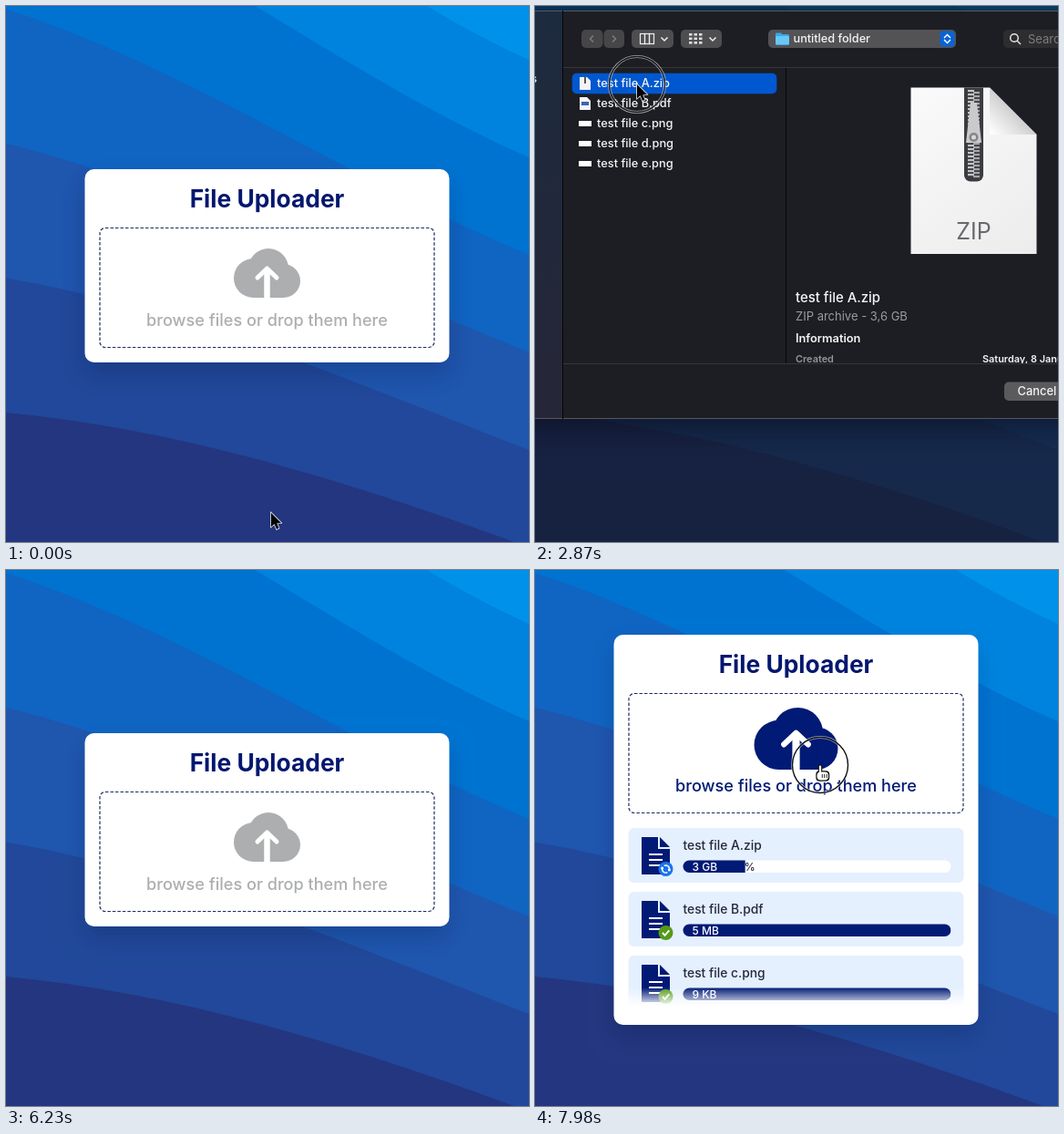
Write an HTML page with a canvas that moves like this. It is 574x588 px and loops after 8000 ms.

```html
<!DOCTYPE html>
<html lang="en">
<head>
<meta charset="utf-8">
<title>File Uploader</title>
<style>
html, body { margin: 0; width: 574px; height: 588px; overflow: hidden; background: #0073d1; }
canvas { display: block; width: 574px; height: 588px; }
</style>
</head>
<body>
<canvas id="stage"></canvas>
<script>
const W = 574, H = 588, LOOP = 8000, STEP = 70;
const NAVY = '#001a75', INK = '#25283a', PALE = '#e4f0fe', LIGHT = '#f4f4f6', GREEN = '#78b828';
const canvas = document.getElementById('stage');
const c = canvas.getContext('2d');
const dpr = window.devicePixelRatio || 1;
canvas.width = W * dpr;
canvas.height = H * dpr;

const span = (t, a, b) => Math.max(0, Math.min(1, (t - a) / (b - a)));
const lerp = (a, b, k) => a + (b - a) * k;
const smooth = k => k * k * (3 - 2 * k);
const easeOut = k => 1 - (1 - k) ** 3;
const grey = v => `rgb(${v},${v},${v + 3})`;

function rect(x, y, w, h, fill, r = 0) {
  c.beginPath();
  c.roundRect(x, y, w, h, r);
  c.fillStyle = fill;
  c.fill();
}
function text(s, x, y, size, fill, weight = 400, align = 'left') {
  c.font = `${weight} ${size}px Inter, sans-serif`;
  c.textAlign = align;
  c.fillStyle = fill;
  c.fillText(s, x, y);
}
function trace(points) {
  c.beginPath();
  points.forEach(([x, y]) => c.lineTo(x, y));
}
function poly(points, fill) {
  trace(points);
  c.fillStyle = fill;
  c.fill();
}
function line(points, stroke, width = 1.5) {
  trace(points);
  c.strokeStyle = stroke;
  c.lineWidth = width;
  c.stroke();
}
function disc(x, y, r, fill) {
  c.beginPath();
  c.arc(x, y, r, 0, 7);
  c.fillStyle = fill;
  c.fill();
}
function ring(x, y, r, stroke, width, from = 0, to = 7) {
  c.beginPath();
  c.arc(x, y, r, from, to);
  c.strokeStyle = stroke;
  c.lineWidth = width;
  c.stroke();
}
function at(x, y, draw, angle = 0, scale = 1) {
  c.save();
  c.translate(x, y);
  c.rotate(angle);
  c.scale(scale, scale);
  draw();
  c.restore();
}
function clipped(x, y, w, h, draw, r = 0) {
  c.save();
  c.beginPath();
  c.roundRect(x, y, w, h, r);
  c.clip();
  draw();
  c.restore();
}
function shadowed(color, blur, dy, draw) {
  c.save();
  c.shadowColor = color;
  c.shadowBlur = blur * dpr;
  c.shadowOffsetY = dy * dpr;
  draw();
  c.restore();
}
function fade(x0, y0, x1, y1, from, to) {
  const g = c.createLinearGradient(x0, y0, x1, y1);
  g.addColorStop(0, from);
  g.addColorStop(1, to);
  return g;
}
// Sheet of paper with its top right corner cut
function page(x, y, w, h, fold, fill) {
  poly([[x, y], [x + w - fold, y], [x + w, y + fold], [x + w, y + h], [x, y + h]], fill);
}

// Evenly spaced waves, from the top right corner down
const waves = ['#243680', '#21489a', '#1f56ae', '#1064c2', '#0073d1', '#0083de'];
function background() {
  rect(0, 0, W, H, '#0092ea');
  for (let k = 5; k >= 0; k--) {
    const left = 446 - 147.5 * k, right = 594 - 107 * k;
    c.beginPath();
    c.moveTo(0, left);
    c.bezierCurveTo(190, left + 18 + 14 * k, 380, right - 72 - 3 * k, W, right);
    c.lineTo(W, H + 9);
    c.lineTo(0, H + 9);
    c.fillStyle = waves[k];
    c.fill();
  }
}

function cloud(fill) {
  disc(-15, 5.5, 21.5, fill);
  disc(1.5, -5, 22, fill);
  disc(18, 8.5, 18.5, fill);
  rect(-15, 0, 33, 27, fill);
  c.lineCap = c.lineJoin = 'round';
  line([[-10.5, 5], [0, -5], [10.5, 5]], '#fff', 5);
  c.lineCap = 'butt';
  line([[0, -4], [0, 27.5]], '#fff', 6.5);
}

function badge(done, t) {
  disc(0, 0, 8, done ? '#559b18' : '#1a73e8');
  if (done) return line([[-3.5, 0], [-1, 2.8], [3.8, -2.6]], '#fff', 1.9);
  for (let i = 0; i < 2; i++) {
    const a = t / 400 + Math.PI * i;
    ring(0, 0, 4, '#fff', 1.5, a, a + 2.2);
    disc(4 * Math.cos(a + 2.3), 4 * Math.sin(a + 2.3), 1.5, '#fff');
  }
}

function fileRow(y, name, size, part, done, t) {
  rect(102.5, y, 368, 60, PALE, 6);
  at(117, y + 10, () => {
    page(0, 0, 31, 41, 11, NAVY);
    line([[19, 0], [19, 12], [31, 12]], PALE, 2);
    for (let i = 0; i < 3; i++) rect(8, 18 + 6 * i, 15, 2, '#fff');
  });
  at(143.5, y + 45, () => badge(done, t));
  text(name, 162.5, y + 23.5, 13.8, INK, 500);
  clipped(162.5, y + 35.5, 294, 13.5, () => {
    const w = 294 * part, base = y + 46.5;
    rect(162, y + 35, 295, 15, '#fff');
    text(size, 172.5, base, 12, NAVY, 500);
    if (!done) {
      rect(207, y + 38, 1, 9, NAVY);
      text(Math.round(part * 100) + 2 + '%', 215, base, 12, INK, 500);
    }
    rect(162, y + 35, w + 0.5, 15, NAVY);
    // A narrow bar wraps the unit out of sight
    if (w > 18) text(w > 38 ? size : size[0], 172.5, base, 12, '#fff', 500);
  }, 7);
}

function card(t) {
  const grow = easeOut(span(t, 6280, 6860));
  const hover = smooth(t < 5800 ? span(t, 280, 560) : span(t, 7160, 7490));
  const top = 179 - 108 * grow, h = 212 + 216 * grow;
  shadowed('rgba(0,15,60,.2)', 26, 13, () => rect(86.5, top, 400, h, '#fff', 10));
  text('File Uploader', 286.5, top + 42, 26.4, '#04176f', 700, 'center');

  c.beginPath();
  c.roundRect(103, top + 64.5, 367, 131, 6);
  c.setLineDash([3.5, 2]);
  c.strokeStyle = '#1c2a5e';
  c.lineWidth = 1.2;
  c.stroke();
  c.setLineDash([]);

  const tone = `rgb(${lerp(172, 0, hover)},${lerp(174, 26, hover)},${lerp(176, 117, hover)})`;
  at(286.5, top + 114, () => cloud(tone), 0, 1 + 0.26 * hover);
  text('browse files or drop them here', 286.5, top + 172, 18.1, tone, 500, 'center');

  if (!grow) return;
  const listTop = top + 212, listH = Math.max(0, h - 228), end = listTop + listH;
  const partA = Math.max(0, 0.1 + 0.000157 * (t - 7140));
  const rest = smooth(span(t, 6560, 7000));
  clipped(102, listTop, 370, listH, () => {
    fileRow(listTop, 'test file A.zip', '3 GB', partA, false, t);
    fileRow(listTop + 70, 'test file B.pdf', '5 MB', rest, true, t);
    fileRow(listTop + 140, 'test file c.png', '9 KB', rest, true, t);
    rect(102, end - 26, 370, 27, fade(0, end - 25, 0, end - 4, 'rgba(255,255,255,0)', '#fff'));
  });
}

const button = (x, w, shade) => rect(x, 26, w, 20, grey(shade), 5);
const chevron = (x, y, angle, stroke) =>
  at(x, y, () => line([[-3.5, -2], [0, 1.5], [3.5, -2]], stroke), angle);

function toolbar() {
  button(51, 23.5, 70);
  button(75.5, 22.5, 70);
  button(106, 46, 78);
  button(160, 45, 78);
  button(256, 206, 83);
  button(514, 90, 45);
  chevron(62, 36, Math.PI / 2, grey(125));
  chevron(87, 36, -Math.PI / 2, grey(125));
  chevron(142, 36.5, 0, '#eee');
  chevron(195, 36.5, 0, '#eee');

  c.strokeStyle = '#eee';
  c.lineWidth = 1.2;
  for (let i = 0; i < 3; i++) c.strokeRect(115.5 + 5 * i, 30.5, 5, 11);
  for (let i = 0; i < 9; i++) rect(169 + i % 3 * 5.5, 30 + (i / 3 | 0) * 4.5, 3.5, 2.6, '#ddd');

  rect(264, 29.5, 7, 5, '#3aa7e4', 1);
  rect(264, 31, 15, 11.5, '#3aa7e4', 1.5);
  rect(264, 33, 15, 9.5, '#68c8f8', 1.5);
  text('untitled folder', 283.5, 40, 12.7, LIGHT, 500);
  rect(444.5, 27.5, 16, 17, '#0a63d6', 4);
  chevron(452.5, 33, Math.PI, '#fff');
  chevron(452.5, 39, 0, '#fff');

  ring(526, 35, 4.3, '#e4e4e6', 1.5);
  line([[529, 38], [533, 42]], '#e4e4e6');
  text('Search', 541, 40.5, 13, grey(125));
}

function smallIcon(i, y) {
  if (i > 1) return rect(48, y + 8, 14, 6, '#fff');
  page(49, y + 4, 12, 14, 4, LIGHT);
  if (i) rect(51, y + 9, 8, 4, '#3d62b0');
  else rect(54, y + 4, 2, 7, '#555');
}

function fileList(selected) {
  if (selected) rect(40.7, 73.7, 224.6, 22 * selected + 0.6, '#0058d0', 5);
  ['A.zip', 'B.pdf', 'c.png', 'd.png', 'e.png'].forEach((name, i) => {
    const y = 74 + 22 * i;
    if (i && selected > 1) rect(48, y - 0.5, 210, 1, '#3a7fe0');
    smallIcon(i, y);
    text('test file ' + name, 68, y + 15.2, 12.8, LIGHT, 500);
  });
}

function zipPreview() {
  page(412.5, 89.5, 138, 182.5, 51.5, fade(412, 90, 550, 272, '#fafafa', '#ececec'));
  poly([[499, 89.5], [550.5, 141], [499, 141]], fade(500, 140, 525, 115, '#fff', '#cfcfcf'));
  rect(471, 89.5, 21, 103, '#3b3c40', [0, 0, 7, 7]);
  for (let i = 0; i < 48; i++) rect(475 + i % 2 * 6, 92 + 2 * i, 7, 2.2, grey(195 - i % 2 * 28));
  poly([[478, 106], [485, 106], [490, 150], [473, 150]], grey(202));
  disc(481.5, 144, 5, grey(133));
  disc(481.5, 144, 2.5, grey(216));
  text('ZIP', 481.5, 256, 25, '#67696d', 400, 'center');
}

function sheet(x, w, angle) {
  at(x, 180.5, () => {
    rect(-w / 2, -23, w, 46, '#fff');
    rect(-w / 2, -23, 2, 46, GREEN);
    rect(-w / 2, 20, w, 3.5, '#1d2c42');
    c.strokeStyle = '#777';
    c.lineWidth = 0.6;
    c.strokeRect(-w / 2, -23, w, 46);
    text('Content Navigation with key footer-navigation-content not found.', -w / 2, 17, w / 38, '#222', 600);
  }, angle);
}

function preview(all) {
  if (all) {
    sheet(472, 188, 0.13);
    sheet(482, 188, -0.144);
    rect(447, 200, 20, 8, '#d9863b');
    sheet(481.5, 175, 0);
  } else {
    zipPreview();
  }
  text(all ? '5 items' : 'test file A.zip', 286, 325, 14.9, LIGHT, 500);
  text(all ? '5 documents - 3,61 GB' : 'ZIP archive - 3,6 GB', 286, 345, 13, grey(155));
  text('Information', 286, 369, 12.8, LIGHT, 600);
  text('Created', 286, 391, 10.9, grey(150), 600);
  text(all ? '8 November 2021' : 'Saturday, 8 January 2022', all ? 544 : 491, 391, 10.9, LIGHT, 600);
}

function dialog(t) {
  const selected = t < 2870 ? 0 : t < 4130 ? 1 : 5;
  c.globalAlpha = t < 5880 ? 1 : 0.5;
  shadowed('rgba(0,0,10,.5)', 36, 8, () => rect(-99, 5, W + 198, 448, '#1d1e23'));
  rect(0, 5, 30, 448, fade(0, 5, 0, 453, '#1d2b3e', '#262638'));
  text('s', -4.5, 84, 12.5, LIGHT, 500);
  for (const y of [67, 392]) rect(31, y, W, 1, grey(54));
  for (const y of [5, 452]) rect(0, y, W, 1, grey(88));
  rect(30, 5, 1, 448, grey(5));
  rect(275, 68, 1, 324, grey(5));
  toolbar();
  rect(515, 412.5, 80, 20.5, grey(91), 5);
  text('Cancel', 529.5, 427.3, 12.9, LIGHT, 500);
  if (t >= 1960) fileList(selected);
  if (selected) clipped(276, 68, 298, 324, () => preview(selected > 1));
  c.globalAlpha = 1;
}

// Pointer moves: start, duration, destination
const moves = [
  [0, 420, 288, 300], [1820, 1, 197, 184], [1960, 700, 112, 86], [3640, 260, 143, 180],
  [4480, 630, 590, 445], [6930, 210, 352, 275], [7140, 560, 313, 214]
];
const presses = [[910, 1400], [2870, 3010], [4060, 4200], [7840, LOOP]];

function arrow() {
  trace([[0, 0], [0, 15.5], [3.5, 12.3], [6, 18], [8.6, 16.8], [6.2, 11.4], [11, 11]]);
  c.closePath();
  c.strokeStyle = '#fff';
  c.lineWidth = 1.4;
  c.stroke();
  c.fillStyle = '#000';
  c.fill();
}
function hand() {
  for (const [grow, fill] of [[0.7, '#111'], [-0.5, '#fff']]) {
    rect(-1.6 - grow, -grow, 3.2 + 2 * grow, 11 + grow, fill, 2);
    rect(-4 - grow, 7 - grow, 13.5 + 2 * grow, 10 + 2 * grow, fill, 4);
  }
  for (let i = 0; i < 3; i++) rect(1.8 + 2.5 * i, 10, 0.9, 4, '#111');
}

function pointer(t) {
  let x = 291, y = 556;
  for (const [start, length, toX, toY] of moves) {
    const k = smooth(span(t, start, start + length));
    x = lerp(x, toX, k);
    y = lerp(y, toY, k);
  }
  const onDrop = (t < 1820 && y < 375) || (t > 7000 && y < 267);
  if (presses.some(([from, to]) => t >= from && t <= to)) {
    ring(x, y, 30.5, 'rgba(255,255,255,.6)', 3);
    ring(x, y, 30.5, '#111', 1.4);
  }
  at(x, y, onDrop ? hand : arrow);
}

function draw(t) {
  c.setTransform(dpr, 0, 0, dpr, 0, 0);
  background();
  card(t);
  const dim = Math.min(span(t, 1540, 1680), 1 - span(t, 5810, 6160));
  rect(0, 0, W, H, `rgba(15,20,24,${0.6 * dim})`);
  if (t >= 1820 && t < 5950) dialog(t);
  pointer(t);
}

const start = performance.now();
function tick() {
  const t = (performance.now() - start) % LOOP;
  draw(Math.floor(t / STEP) * STEP);
  requestAnimationFrame(tick);
}
tick();
</script>
</body>
</html>
```
